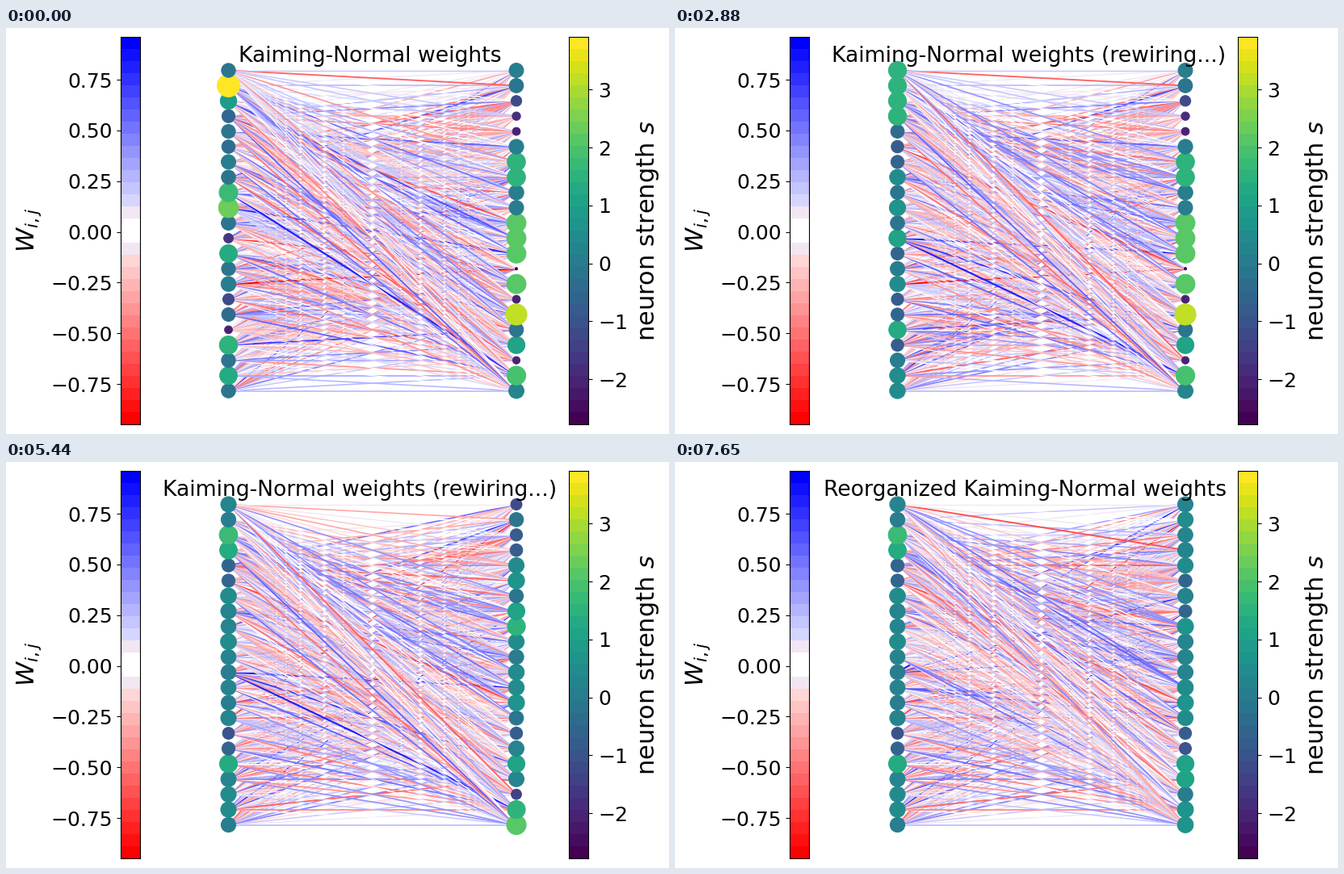
These frames come from a looping animation (821x503 px, 8 s). A matplotlib script:

```python
import matplotlib.pyplot as plt
import numpy as np
from matplotlib.animation import FuncAnimation
from matplotlib.collections import LineCollection
from matplotlib.colors import ListedColormap, Normalize

WIDTH, HEIGHT, DPI = 821, 503, 100
LOOP_MS, TICK_MS, STEP_MS = 8000, 40, 170
PHASE_STARTS = (500, 4250)
NODES = 22
LEFT_X, RIGHT_X = 275.5, 632
NODE_Y = np.linspace(449.5, 52.5, NODES)      # node 0 sits at the bottom
rng = np.random.default_rng(7)


def strengths(typical, standouts):
    """Strengths scattered around a typical value, apart from the standouts."""
    values = typical + rng.normal(0, 0.2, NODES)
    values[list(standouts)] = list(standouts.values())
    return values


LEFT_START = strengths(-0.25, {20: 3.9, 19: 0.7, 13: 1.7, 12: 2.3, 10: -1.7,
                               9: 1.2, 6: -1.2, 4: -2.1, 3: 1.5, 1: 1.2})
LEFT_END = strengths(0.25, {19: 1.6, 18: 1.2, 17: -0.6, 16: -0.6,
                            6: -1.0, 5: -0.6, 4: 1.3})
RIGHT_START = strengths(0, {19: -1.3, 18: -1.9, 17: -2.0, 15: 1.6, 14: 1.6,
                            11: 2.1, 10: 2.1, 9: 2.1, 8: -2.75, 7: 2.1,
                            6: -2.0, 5: 3.1, 3: 1.1, 2: -2.1, 1: 1.9})
RIGHT_END = strengths(0.4, {16: -0.5, 14: -0.6, 6: -0.8, 5: -0.9,
                            4: 1.1, 3: 1.1})


def initial_weights():
    weights = rng.normal(0, np.sqrt(2 / NODES), (NODES, NODES))
    weights += ((LEFT_START - weights.sum(1)) / NODES)[:, None]
    return weights + (RIGHT_START - weights.sum(0)) / NODES


def rewire(weights, target):
    """Reorder one column per step until the row sums reach the target."""
    final = weights.copy()
    for c in range(1, NODES):
        remaining = NODES - c
        wish = (final[:, c] + target - final.sum(1)) / remaining
        if remaining > 1:
            wish += rng.normal(0, 0.3, NODES)
        final[np.argsort(wish), c] = np.sort(final[:, c])
    gap = target - final.sum(1)
    final[:, 1:] += ((gap - gap.mean()) / (NODES - 1))[:, None]
    return [np.hstack([final[:, :c], weights[:, c:]]) if c > 1 else weights
            for c in range(1, NODES + 1)]


first = rewire(initial_weights(), LEFT_END)
second = rewire(first[-1].T, RIGHT_END)
STATES = first + [w.T for w in second[1:]]


def weight_colormap():
    colors = plt.get_cmap("bwr_r", 32)(np.arange(32))
    colors[15:17, :3] = 1
    colors[[14, 17], :3] = 0.95, 0.905, 0.95
    return ListedColormap(colors)


WEIGHT_CMAP, WEIGHT_NORM = weight_colormap(), Normalize(-0.948, 0.961)
NODE_CMAP, NODE_NORM = plt.get_cmap("viridis", 32), Normalize(-2.78, 3.91)

plt.rcParams["font.family"] = "DejaVu Sans"
fig = plt.figure(figsize=(WIDTH / DPI, HEIGHT / DPI), dpi=DPI, facecolor="white")
stage = fig.add_axes([0, 0, 1, 1])
stage.set(xlim=(0, WIDTH), ylim=(HEIGHT, 0))
stage.axis("off")


def color_scale(x, cmap, norm, ticks, side, pad):
    ax = fig.add_axes([x / WIDTH, 12 / HEIGHT, 24 / WIDTH, 480 / HEIGHT])
    ax.imshow(np.arange(32)[:, None], cmap=cmap, origin="lower", aspect="auto",
              interpolation="nearest", extent=(0, 1, norm.vmin, norm.vmax))
    ax.set_xticks([])
    ax.set_yticks(ticks)
    ax.yaxis.set_ticks_position(side)
    ax.tick_params(labelsize=18, pad=pad)


color_scale(142, WEIGHT_CMAP, WEIGHT_NORM, np.arange(-3, 4) / 4, "left", 3.5)
color_scale(697, NODE_CMAP, NODE_NORM, np.arange(-2, 4), "right", 5.5)
stage.text(11.5, 251, "$W_{i,j}$", size=22, rotation=90, ha="left", va="center")
stage.text(811, 251, "neuron strength $s$", size=22, rotation=90,
           ha="right", va="center")

edges = LineCollection(
    [[(LEFT_X, a), (RIGHT_X, b)] for a in NODE_Y for b in NODE_Y],
    cmap=WEIGHT_CMAP, norm=WEIGHT_NORM, zorder=1)
stage.add_collection(edges)
nodes = stage.scatter(np.repeat([LEFT_X, RIGHT_X], NODES), np.tile(NODE_Y, 2),
                      c=np.zeros(2 * NODES), cmap=NODE_CMAP, norm=NODE_NORM,
                      linewidths=0.7, zorder=2)
title = stage.text(0, 42, "", size=19.2, zorder=3)


def steps_done(t, start):
    return int(np.clip((t - start) // STEP_MS + 1, 0, NODES - 1))


def draw(frame):
    t = frame * TICK_MS + 30
    step = sum(steps_done(t, start) for start in PHASE_STARTS)
    weights = STATES[step]
    edges.set_array(weights.ravel())
    edges.set_linewidths(0.9 + 0.8 * np.abs(weights.ravel()))

    strength = np.concatenate([weights.sum(1), weights.sum(0)])
    radius_sq = 1.5 + 28.8 * np.clip(strength - NODE_NORM.vmin, 0, None)
    nodes.set_array(strength)
    nodes.set_sizes(4 * radius_sq * (72 / DPI) ** 2)

    if step == 0:
        x, text = 287.5, "Kaiming-Normal weights"
    elif step < len(STATES) - 1:
        x, text = 194, "Kaiming-Normal weights (rewiring...)"
    else:
        x, text = 184.5, "Reorganized Kaiming-Normal weights"
    title.set_x(x)
    title.set_text(text)
    return edges, nodes, title


animation = FuncAnimation(fig, draw, frames=LOOP_MS // TICK_MS, interval=TICK_MS,
                          repeat=True, repeat_delay=0)
plt.show()
```
